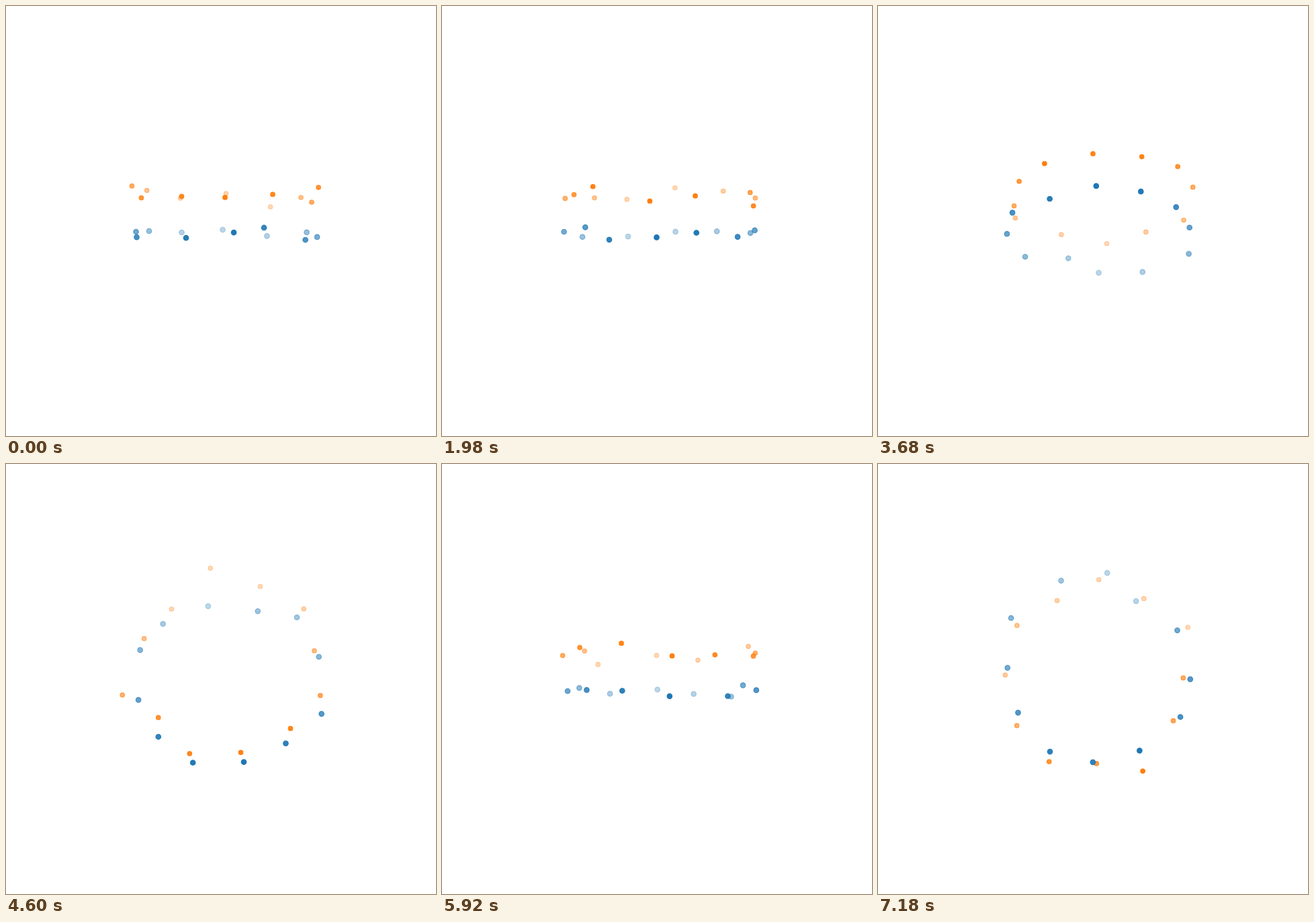
Write an HTML page with a canvas that moves like this. It is 640x640 px and loops after 7200 ms.

```html
<!DOCTYPE html>
<html lang="en">
<head>
<meta charset="utf-8">
<title>Two rings</title>
<style>
html, body { margin: 0; width: 100%; height: 100%; overflow: hidden; background: #fff; }
canvas { display: block; width: 640px; height: 640px; }
</style>
</head>
<body>
<canvas id="stage" width="640" height="640"></canvas>
<script>
const ctx = document.getElementById('stage').getContext('2d');
const STEP = 20, STEPS = 360;
const CX = 328.4, CY = 311.4, DIST = 3459;
const RAD = Math.PI / 180;

// Each point: right, front, up, in pixels as seen at the start.
const rings = [
  {
    color: '#1f77b4', radius: 3.8,
    points: [
      [-131, 74.9, -32], [-58.1, 132.8, -32.5], [10.2, 147.6, -24.6],
      [53.9, 106.8, -18], [115.2, 59.8, -36], [135.2, -12.7, -32.6],
      [121.5, -68.2, -26], [62.1, -120.2, -32], [-6.1, -137.2, -22.5],
      [-69.3, -123.2, -26.5], [-117.6, -65.6, -24], [-134.8, 1.2, -24.6]
    ]
  },
  {
    color: '#ff7f0e', radius: 3.3,
    points: [
      [-140.9, 2.9, 43.4], [-124.2, 75.6, 25.3], [-64.7, 115.4, 27],
      [-2.3, 148.4, 25.3], [66.2, 121.3, 29.9], [133.5, 80.3, 40.4],
      [126.6, -1.4, 19.4], [112.7, -65.3, 26.9], [67.9, -144, 12.9],
      [-0.9, -131, 33.4], [-71.5, -130.3, 26.3], [-121.3, -75, 37.7]
    ]
  }
];

function project([right, front, up], azim, elev) {
  const ca = Math.cos(azim), sa = Math.sin(azim);
  const ce = Math.cos(elev), se = Math.sin(elev);
  const side = right * ca - front * sa;
  const toward = front * ca + right * sa;
  const near = toward * ce + up * se;
  const scale = DIST / (DIST - near);
  return {
    x: CX + side * scale,
    y: CY - (up * ce - toward * se) * scale,
    near
  };
}

function drawRing({ color, radius, dots }) {
  const far = dots[0].near;
  const span = dots[dots.length - 1].near - far;
  ctx.fillStyle = ctx.strokeStyle = color;
  ctx.lineWidth = 1.1;
  for (const dot of dots) {
    ctx.globalAlpha = 0.3 + 0.7 * (dot.near - far) / span;
    ctx.beginPath();
    ctx.arc(dot.x, dot.y, radius, 0, 2 * Math.PI);
    ctx.fill();
    ctx.stroke();
  }
}

function draw(step) {
  const azim = step * RAD;
  const elev = Math.pow(step, 0.8) * Math.sin(step / (10 * Math.PI)) * RAD;
  ctx.globalAlpha = 1;
  ctx.fillStyle = '#fff';
  ctx.fillRect(0, 0, 640, 640);
  rings
    .map(ring => ({
      ...ring,
      dots: ring.points
        .map(p => project(p, azim, elev))
        .sort((a, b) => a.near - b.near)
    }))
    .sort((a, b) => a.dots[11].near - b.dots[11].near)
    .forEach(drawRing);
}

const start = performance.now();
function tick() {
  const time = Math.max(0, performance.now() - start);
  draw(Math.floor(time / STEP) % STEPS);
  requestAnimationFrame(tick);
}
tick();
</script>
</body>
</html>
```
